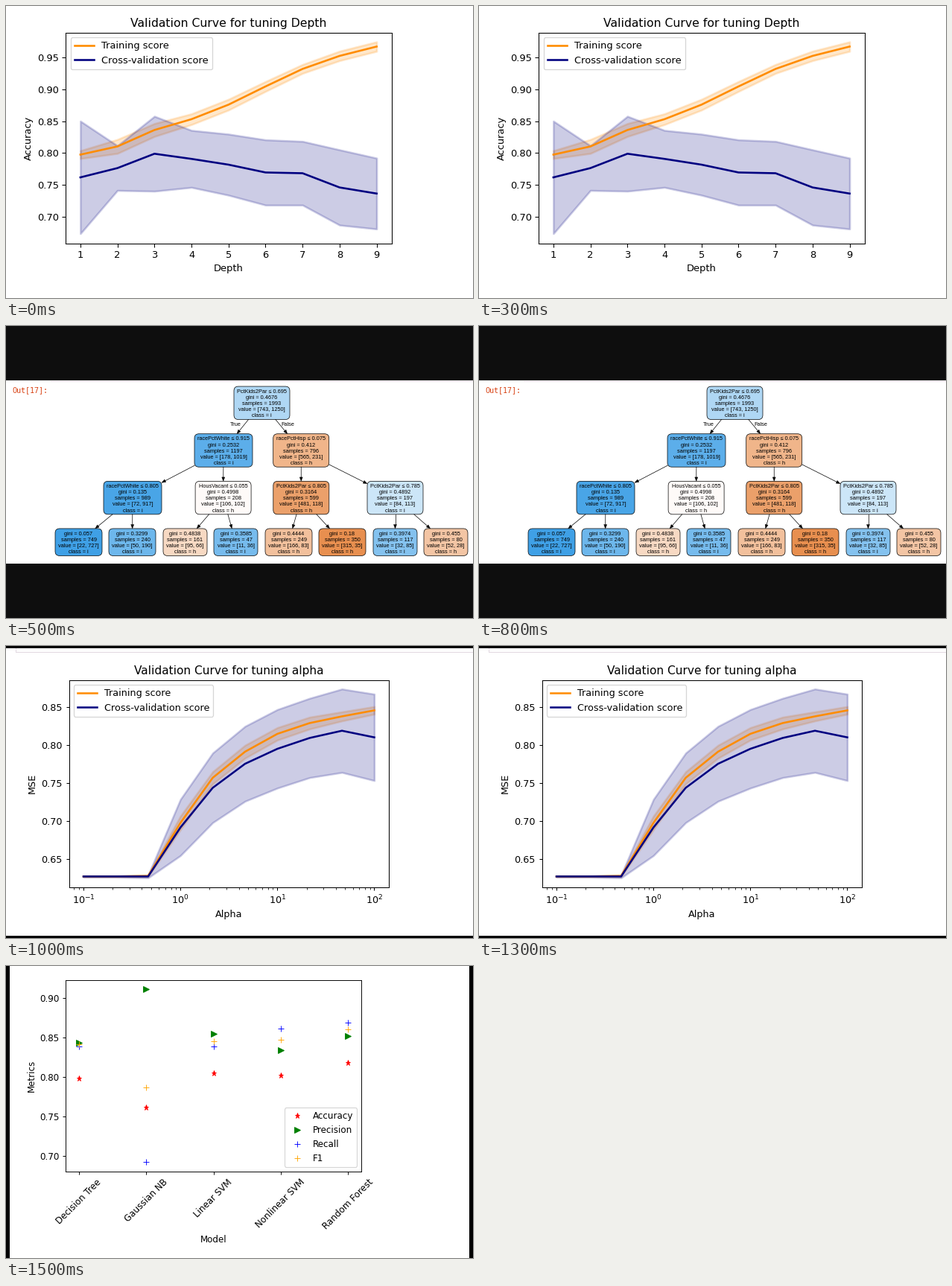
A matplotlib script that plays this animation: 627x392 px, repeating every 2 s.

```python
import matplotlib.pyplot as plt
import numpy as np
from matplotlib.animation import FuncAnimation
from matplotlib.patches import FancyBboxPatch, Polygon, Rectangle

W, H, DPI = 627, 392, 64
PT = 72 / DPI  # points per pixel
plt.rcParams["font.family"] = "DejaVu Sans"
fig = plt.figure(figsize=(W / DPI, H / DPI), dpi=DPI, facecolor="white")

SCALED = ["font.size", "axes.linewidth", "lines.linewidth", "lines.markersize",
          "patch.linewidth", "axes.labelpad", "axes.titlepad"]


def stage():
    """Full-size axes measured in pixels, y pointing down."""
    ax = fig.add_axes([0, 0, 1, 1])
    ax.set(xlim=(0, W), ylim=(H, 0))
    ax.axis("off")
    return ax


def block(ax, x0, y0, x1, y1, color):
    ax.add_patch(Rectangle((x0, y0), x1 - x0, y1 - y0, fc=color, lw=0))


def chart(left, top, right, bottom, scale, xlim, ylim, logx=False):
    """Default-styled axes at a pixel box, with every size scaled."""
    k = scale * PT
    for key in SCALED:
        plt.rcParams[key] = plt.rcParamsDefault[key] * k
    ax = fig.add_axes([left / W, 1 - bottom / H,
                       (right - left) / W, (bottom - top) / H])
    if logx:
        ax.set_xscale("log")
    ax.set(xlim=xlim, ylim=ylim)
    ax.tick_params(which="major", length=3.5 * k, width=0.8 * k,
                   pad=3.5 * k, labelsize=10 * k)
    ax.tick_params(which="minor", length=2 * k, width=0.6 * k)
    return ax


def score(ax, x, mean, std, color, label, scale):
    mean, std = np.array(mean), np.array(std)
    lw = 2 * scale * PT
    ax.plot(x, mean, color=color, lw=lw, label=label)
    ax.fill_between(x, mean - std, mean + std, color=color, alpha=0.2, lw=lw)


def depth_scene():
    s = 1.304
    ax = chart(80, 35.7, 517.5, 318.6, s, (0.6, 9.4), (0.6577, 0.9896))
    x = np.arange(1, 10)
    score(ax, x,
          [.7974, .8103, .8362, .8532, .8761, .9048, .9324, .9529, .9676],
          [.0062, .0110, .0102, .0085, .0085, .0078, .0070, .0075, .0075],
          "darkorange", "Training score", s)
    score(ax, x,
          [.7616, .7762, .7988, .7907, .7816, .7693, .7681, .7457, .7361],
          [.0886, .0352, .0590, .0449, .0481, .0514, .0502, .0593, .0558],
          "navy", "Cross-validation score", s)
    ax.set_xticks(x)
    ax.set_yticks(np.arange(0.70, 0.96, 0.05))
    ax.set(title="Validation Curve for tuning Depth",
           xlabel="Depth", ylabel="Accuracy")
    ax.legend(loc="upper left")
    return [ax]


def alpha_scene():
    back = stage()
    block(back, 0, 0, W, 3, "black")
    block(back, 0, 389, W, H, "black")
    block(back, 13, 8, W, 9, "#e2d8e0")
    block(back, 13, 3, 14, 9, "#e2d8e0")

    s = 1.28
    ax = chart(84.5, 45.6, 514, 323.5, s, (10**-1.15, 10**2.15),
               (0.6137, 0.8861), logx=True)
    x = np.logspace(-1, 2, 10)
    score(ax, x,
          [.6275, .6275, .6282, .6980, .7574, .7917, .8152, .8294, .8382, .8461],
          [.0005, .0005, .0010, .0090, .0080, .0085, .0082, .0078, .0060, .0050],
          "darkorange", "Training score", s)
    score(ax, x,
          [.6275, .6275, .6275, .6920, .7442, .7758, .7955, .8098, .8193, .8106],
          [.0010, .0010, .0018, .0370, .0458, .0493, .0517, .0522, .0549, .0569],
          "navy", "Cross-validation score", s)
    ax.set_yticks(np.arange(0.65, 0.86, 0.05))
    ax.set(title="Validation Curve for tuning alpha",
           xlabel="Alpha", ylabel="MSE")
    ax.legend(loc="upper left")
    return [back, ax]


def metrics_scene():
    back = stage()
    block(back, 0, 0, 5, H, "black")
    block(back, 622, 0, W, H, "black")

    ax = chart(80, 18.5, 477, 275.5, 1.184, (-0.2, 4.2), (0.6807, 0.9226))
    series = [
        ("Accuracy", "red", "*", [.7979, .7612, .8045, .8012, .8181]),
        ("Precision", "green", ">", [.8431, .9113, .8544, .8332, .8511]),
        ("Recall", "blue", "+", [.8388, .6920, .8379, .8609, .8689]),
        ("F1", "orange", "+", [.8416, .7866, .8454, .8468, .8600]),
    ]
    for label, color, marker, values in series:
        ax.plot(range(5), values, ls="", marker=marker, color=color, label=label)
    ax.set_xticks(range(5), ["Decision Tree", "Gaussian NB", "Linear SVM",
                             "Nonlinear SVM", "Random Forest"], rotation=45)
    ax.set_yticks(np.arange(0.70, 0.91, 0.05))
    ax.set(xlabel="Model", ylabel="Metrics")
    ax.legend(loc="lower right")
    return [back, ax]


# centre x, width, split rule, class counts
LEVELS = [
    (103.3, 44.5, [(343.5, 75, "PctKids2Par ≤ 0.695", (743, 1250))]),
    (167, 44.5, [(292, 78, "racePctWhite ≤ 0.915", (178, 1019)),
                 (396.2, 75, "racePctHisp ≤ 0.075", (565, 231))]),
    (230.6, 44.5, [(170, 78, "racePctWhite ≤ 0.805", (72, 917)),
                   (291.6, 75, "HousVacant ≤ 0.055", (106, 102)),
                   (396.3, 75, "PctKids2Par ≤ 0.805", (481, 118)),
                   (522.5, 75, "PctKids2Par ≤ 0.785", (84, 113))]),
    (290.2, 36.5, [(97.5, 63, "", (22, 727)), (169.5, 63, "", (50, 190)),
                   (240.5, 59, "", (95, 66)), (308.5, 59, "", (11, 36)),
                   (379.5, 63, "", (166, 83)), (451.5, 63, "", (315, 35)),
                   (522.5, 59, "", (32, 85)), (590.5, 59, "", (52, 28))]),
]


def label(ax, x, y, text, size=7.4):
    ax.text(x, y + 0.36 * size, text, size=size * PT, ha="center",
            va="baseline", family="Liberation Sans")


def node(ax, x, y, w, h, rule, counts):
    total, most, least = sum(counts), max(counts), min(counts)
    gini = 2 * most * least / total**2
    base = np.array([229, 129, 57] if counts[0] > counts[1] else [57, 157, 229])
    mix = (most - least) / most
    color = (255 + mix * (base - 255)) / 255
    ax.add_patch(FancyBboxPatch((x - w / 2, y - h / 2), w, h, fc=color,
                                ec="black", lw=0.7 * PT, mutation_aspect=1,
                                boxstyle="round,pad=0,rounding_size=6"))
    lines = [rule] if rule else []
    lines += [f"gini = {round(gini, 4):g}", f"samples = {total}",
              f"value = [{counts[0]}, {counts[1]}]",
              f"class = {'h' if counts[0] > counts[1] else 'i'}"]
    for i, line in enumerate(lines):
        label(ax, x, y + 8.15 * (i - (len(lines) - 1) / 2), line)


def border(center, toward, w, h):
    """Where the ray from a box centre leaves the box."""
    d = toward - center
    t = min(size / 2 / max(abs(v), 1e-9) for size, v in zip((w, h), d))
    return center + t * d


def arrow(ax, parent, child):
    a, b = np.array(parent[:2]), np.array(child[:2])
    start, tip = border(a, b, *parent[2:]), border(b, a, *child[2:])
    u = (tip - start) / np.hypot(*(tip - start))
    neck, side = tip - 5.4 * u, 2 * np.array([-u[1], u[0]])
    ax.plot(*zip(start, neck), color="black", lw=0.7 * PT)
    ax.add_patch(Polygon([tip, neck + side, neck - side], fc="black",
                         ec="black", lw=0.4 * PT))


def tree_scene():
    ax = stage()
    block(ax, 0, 0, W, H, "#0e0e0e")
    block(ax, 0, 73, W, 319, "white")
    block(ax, 60, 73.5, W, 74.5, "#eadbe4")
    ax.text(8.5, 88.7, "Out[17]:", size=10 * PT, color="#d84315",
            va="baseline", family="DejaVu Sans Mono")
    above = []
    for y, h, nodes in LEVELS:
        boxes = [(x, y, w, h) for x, w, _, _ in nodes]
        for i, box in enumerate(boxes):
            if above:
                arrow(ax, above[i // 2], box)
            node(ax, *box, *nodes[i][2:])
        above = boxes
    label(ax, 308.5, 131, "True")
    label(ax, 378.5, 131, "False")
    return [ax]


scenes = [depth_scene(), tree_scene(), alpha_scene(), metrics_scene()]


def update(i):
    for n, axes in enumerate(scenes):
        for ax in axes:
            ax.set_visible(n == i)
    return []


anim = FuncAnimation(fig, update, frames=len(scenes), interval=500,
                     repeat=True, repeat_delay=0, blit=False)
plt.show()
```
